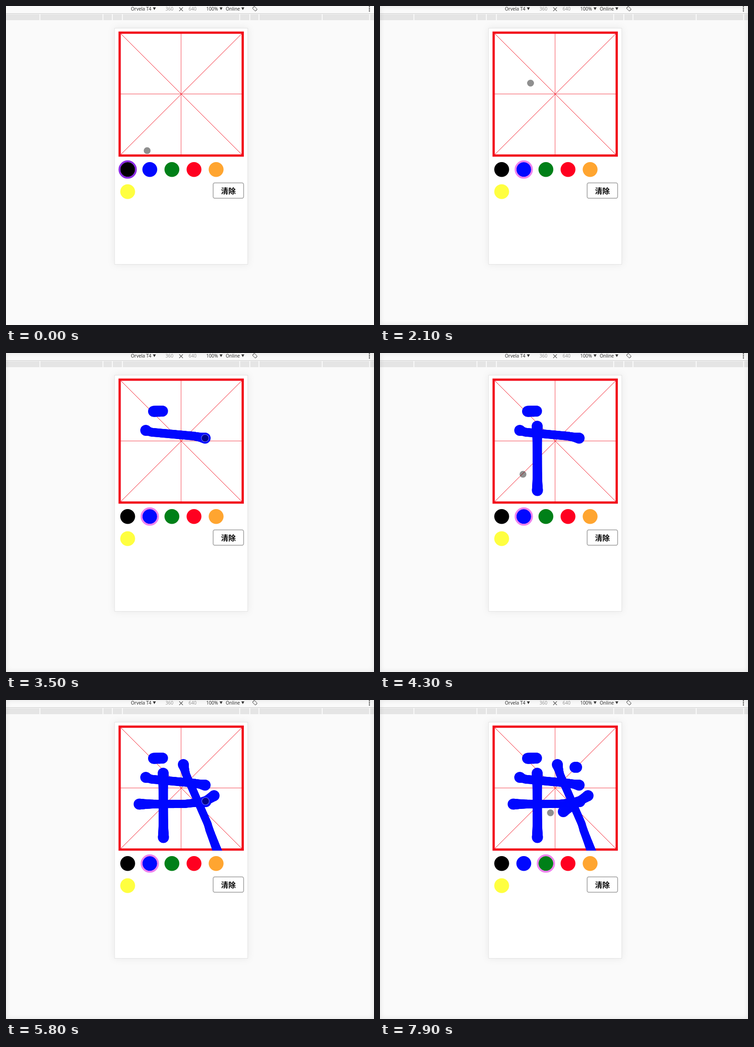
Animation of 803x697 px, one loop 8000 ms. Source, as an HTML page with a canvas:

```html
<!DOCTYPE html>
<html lang="zh">
<head>
<meta charset="utf-8">
<title>Writing pad</title>
<style>
  html, body { margin: 0; width: 100%; height: 100%; overflow: hidden; background: #fafafa; }
  svg, canvas, #edge { position: absolute; left: 0; top: 0; width: 803px; height: 697px; }
  #edge { box-shadow: inset 0 0 12px rgba(0, 0, 0, .1); }
  .bar { font: 10px "Noto Sans", "Open Sans", sans-serif; fill: #333; }
  .dim { fill: #999; }
  .clear { font: bold 16px "Noto Sans CJK SC", "Noto Sans CJK", sans-serif; text-anchor: middle; }
  #phone { filter: drop-shadow(0 0 8px rgba(0, 0, 0, .07)); }
</style>
</head>
<body>
<svg viewBox="0 0 803 697">
  <rect width="803" height="697" fill="#fafafa"/>
  <path d="M0 16.5H803" stroke="#c8c8c8"/>
  <rect y="18" width="803" height="13" fill="#e5e5e5"/>
  <g id="marks" fill="#fff"></g>
  <g class="bar">
    <text x="272.5" y="10">Orvela T4</text>
    <text class="dim" x="348" y="10">360</text>
    <text class="dim" x="398.5" y="10">640</text>
    <text x="437" y="10">100%</text>
    <text x="479.5" y="10">Online</text>
    <g id="arrows"></g>
    <path d="M793 2v9" stroke="#333" stroke-width="2.6" stroke-linecap="round" stroke-dasharray="0 4.4"/>
  </g>
  <g fill="none" stroke="#555">
    <path d="M378 3l8 8m0-8l-8 8" stroke-width="1.1"/>
    <rect x="540" y="1.5" width="6" height="9" rx="1.5" transform="rotate(-45 543 6)"/>
    <path d="M538.5 4.5a5 5 0 0 1 4-3.5m5 6.5a5 5 0 0 1-4 3.5" stroke-width=".8"/>
  </g>
  <rect id="phone" x="237" y="48.5" width="290.5" height="516" fill="#fff" stroke="#e2e2e2"/>
  <g fill="none" stroke="#f20d1c">
    <rect x="248" y="58.25" width="268.5" height="268.5" stroke-width="5"/>
    <path d="M250 60l265 265m0-265l-265 265"/>
    <path d="M382 60v265M250 192.2h265" stroke-width=".8"/>
  </g>
  <g id="dots"></g>
  <rect x="452" y="386.5" width="66.5" height="33.5" rx="3.5" fill="#fff" stroke="#999" stroke-width="1.5"/>
  <text class="clear" x="485.3" y="409.7">清除</text>
</svg>
<canvas width="803" height="697"></canvas>
<div id="edge"></div>
<script>
const LOOP = 8000, STEP = 100;
const INK = "#0008ff";
const COLORS = ["#000", INK, "#008018", "#ff0020", "#ffa530", "#ffff40"];
const dotX = i => 265.5 + (i % 5) * 48.25;
const dotY = i => 357.3 + Math.floor(i / 5) * 48.3;

const fill = (id, items, part) => {
  document.getElementById(id).innerHTML = items.map(part).join("");
};
fill("dots", COLORS, (c, i) => `<circle cx="${dotX(i)}" cy="${dotY(i)}" r="16.2" fill="${c}"/>`);
fill("marks", [74, 211.5, 232, 254, 510, 532, 552, 690, 793.5], x =>
  `<rect x="${x - .8}" y="18" width="1.6" height="13"/>`);
fill("arrows", [320.5, 466, 513.5], x => `<path d="M${x} 3h6.5l-3.25 6z"/>`);

// thin: radius halfway along; points: step, x, y
const STROKES = [
  { thin: 12, points: [[27, 322, 127.5], [28, 341.5, 127]] },
  { thin: 9.5, points: [[30, 305, 169], [31, 317, 173], [34, 410, 181.5], [35, 434.5, 186]] },
  { thin: 10.2, points: [[37, 343, 160], [42, 343.5, 300.5]] },
  { thin: 9, points: [[45, 290.5, 227.5], [46.3, 390, 227], [47, 436, 222]] },
  { thin: 8.6, points: [[50.2, 387, 141], [50.5, 393, 163], [51, 440, 270.5], [51.3, 444, 284], [52, 474, 364]] },
  { thin: 10.3, points: [[57, 454, 209], [58.5, 426, 227], [60, 400, 244]] },
  { thin: 12, points: [[64, 425.5, 147], [64, 429, 147]] }
];

// step, x, y
const MOVES = [
  [0, 308, 316], [4, 272, 357], [6, 277, 352], [12, 268, 355], [16, 315, 357],
  [18, 317, 353], [21, 328.5, 168.5], [22, 339, 150], [26, 322, 128],
  [36, 385, 168], [43, 312, 265], [44, 291, 227], [49, 387, 141.5],
  [51, 469.5, 338.5], [52, 482, 359], [55, 465, 240], [56, 455, 210], [62, 425, 148],
  [66, 430.5, 273.5], [68, 387, 372], [70, 357, 385], [72, 360, 362],
  [74, 361, 358], [75, 363, 345], [77, 372, 272], [79, 372, 246.5]
];
const PAUSES = [1, 5, 11, 17, 50, 63, 73];
const PATH = STROKES.flatMap(s => s.points).concat(MOVES).sort((a, b) => a[0] - b[0]);
// step, dot index, ring colour
const PICKS = [[0, 0, "#8a2be2"], [18, 1, "#ee82ee"], [74, 2, "#ee82ee"]];

const g = document.querySelector("canvas").getContext("2d");
const edge = document.getElementById("edge");
const mix = (a, b, k) => a.map((v, i) => v + (b[i] - v) * k);

function circle(x, y, r) {
  g.beginPath();
  g.arc(x, y, r, 0, Math.PI * 2);
}

function disc(x, y, r, color) {
  circle(x, y, r);
  g.fillStyle = color;
  g.fill();
}

function ring(x, y, r, width, color) {
  circle(x, y, r);
  g.lineWidth = width;
  g.strokeStyle = color;
  g.stroke();
}

// The brush is wide at both ends and thinner between.
function drawStroke({ thin, points }, n) {
  const last = points.length - 1;
  for (let i = 0; i < last; i++) {
    const a = points[i], b = points[i + 1];
    if (a[0] > n) return;
    const end = b[0] > n ? (n - a[0]) / (b[0] - a[0]) : 1;
    const count = Math.max(1, Math.ceil(Math.hypot(b[1] - a[1], b[2] - a[2]) * end / 1.5));
    for (let j = 0; j <= count; j++) {
      const k = end * j / count;
      const [, x, y] = mix(a, b, k);
      const out = Math.abs(2 * (i + k) / last - 1);
      disc(x, y, thin + (12 - thin) * out ** 4, INK);
    }
  }
}

function penAt(step) {
  const n = PAUSES.includes(step) ? step - 1 : step;
  let i = PATH.length - 1;
  while (PATH[i][0] > n) i--;
  const a = PATH[i], b = PATH[i + 1];
  return b ? mix(a, b, (n - a[0]) / (b[0] - a[0])) : a;
}

function draw(n) {
  g.clearRect(0, 0, 803, 697);
  edge.style.opacity = n < 2 ? 0 : 1;

  const [, dot, color] = PICKS.filter(p => p[0] <= n).pop();
  ring(dotX(dot), dotY(dot), 18, 4, color);

  g.save();
  g.beginPath();
  g.rect(245.5, 55.75, 273.5, 273.25);
  g.clip();
  STROKES.forEach(s => drawStroke(s, n));
  g.restore();

  const [, x, y] = penAt(n);
  disc(x, y, 7.6, "rgba(0,0,0,.44)");
  ring(x, y, 8.2, 1.3, "rgba(255,255,255,.36)");
}

const start = performance.now();
function tick() {
  draw(Math.floor((performance.now() - start) % LOOP / STEP));
  requestAnimationFrame(tick);
}
tick();
</script>
</body>
</html>
```
